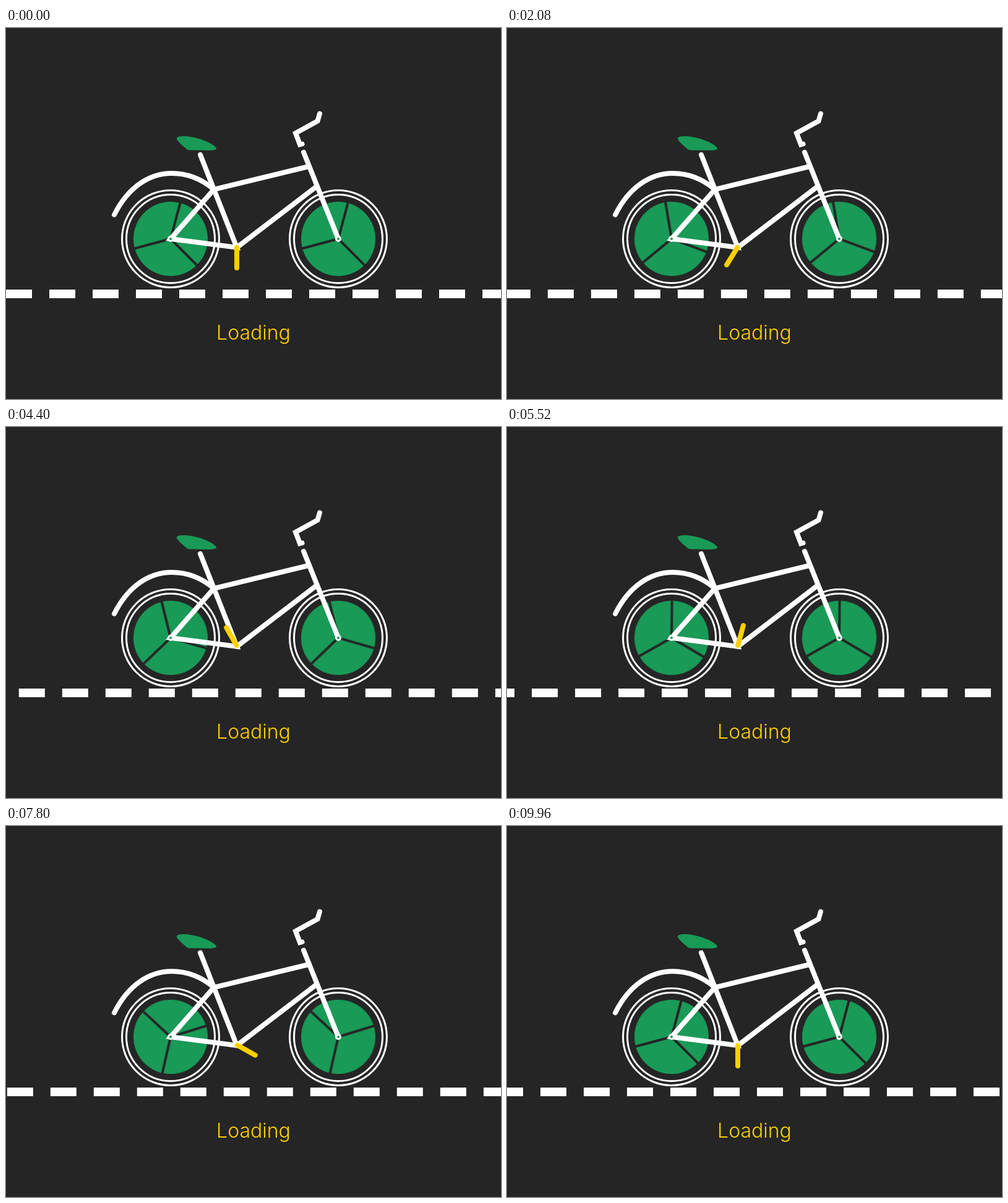
Write an HTML page that moves like this. It is 800 by 600 pixels and loops after 10 s.

```html
<!DOCTYPE html>
<html lang="en">
<head>
<meta charset="utf-8">
<title>Loading</title>
<style>
  html, body { margin: 0; width: 100%; height: 100%; overflow: hidden; background: #252525; }
  svg { display: block; width: 800px; height: 600px; }
  .line { fill: none; stroke: #fff; stroke-width: 8; stroke-linecap: round; }
  .rim { fill: none; stroke: #fff; stroke-width: 3; }
  .green { fill: #199a57; }
  .gap { fill: none; stroke: #252525; stroke-width: 4; }
  .crank { stroke: #ffd000; }
  .road { stroke: #fff; stroke-width: 14; stroke-dasharray: 42 28; }
  .label { font: 300 32px Inter, sans-serif; fill: #ffd000; text-anchor: middle; }

  /* 25 pictures per second, the last one at full progress */
  .spin, .crank, .road {
    transform-origin: 0 0;
    animation: 10s steps(250, jump-none) -4ms infinite;
  }
  .spin { animation-name: spin; }
  .crank { animation-name: pedal; }
  .road { animation-name: roll; }
  @keyframes spin { from { transform: rotate(0deg); } to { transform: rotate(10800deg); } }
  @keyframes pedal { from { transform: rotate(0deg); } to { transform: rotate(3600deg); } }
  @keyframes roll { from { transform: translateX(0); } to { transform: translateX(-1696px); } }
</style>
</head>
<body>
<svg viewBox="0 0 800 600">
  <defs>
    <g id="disc">
      <circle class="green" r="60"/>
      <g transform="rotate(15)">
        <path id="cut" class="gap" d="M0 0V-62"/>
        <use href="#cut" transform="rotate(120)"/>
        <use href="#cut" transform="rotate(240)"/>
      </g>
    </g>
    <g id="rims">
      <circle class="rim" r="78.5"/>
      <circle class="rim" r="71.5"/>
    </g>
    <g id="hub">
      <circle r="5" fill="#fff"/>
      <circle r="2" class="green"/>
    </g>
  </defs>

  <path class="road" d="M0 430H2590"/>

  <g transform="translate(266 341)">
    <use href="#rims"/>
    <use href="#disc" class="spin"/>
  </g>
  <g transform="translate(537 341)">
    <use href="#rims"/>
    <use href="#disc" class="spin"/>
  </g>

  <!-- mudguard, frame, handlebar -->
  <path class="line" d="M175 302C197 258 231 235 268 235C295 235 317 245 336 261"/>
  <path class="line" d="M314 205L373 355L266 341L336 261L489 224M373 355L501 257M481 201L537 341"/>
  <path class="line" d="M507 138.5L503.5 150.5L468 170L475 188.5L478.5 187.5"/>
  <path class="green" d="M276 180C275 176 279 175 289 175C310 176 334 186 340 194C341 197 337 197 331 198L295 197.5C291 196 278 184 276 180Z"/>

  <use href="#hub" x="266" y="341"/>
  <use href="#hub" x="537" y="341"/>

  <g transform="translate(373 354)">
    <path class="line crank" d="M0 1V34"/>
  </g>

  <text class="label" x="400" y="503.5">Loading</text>
</svg>
</body>
</html>
```
